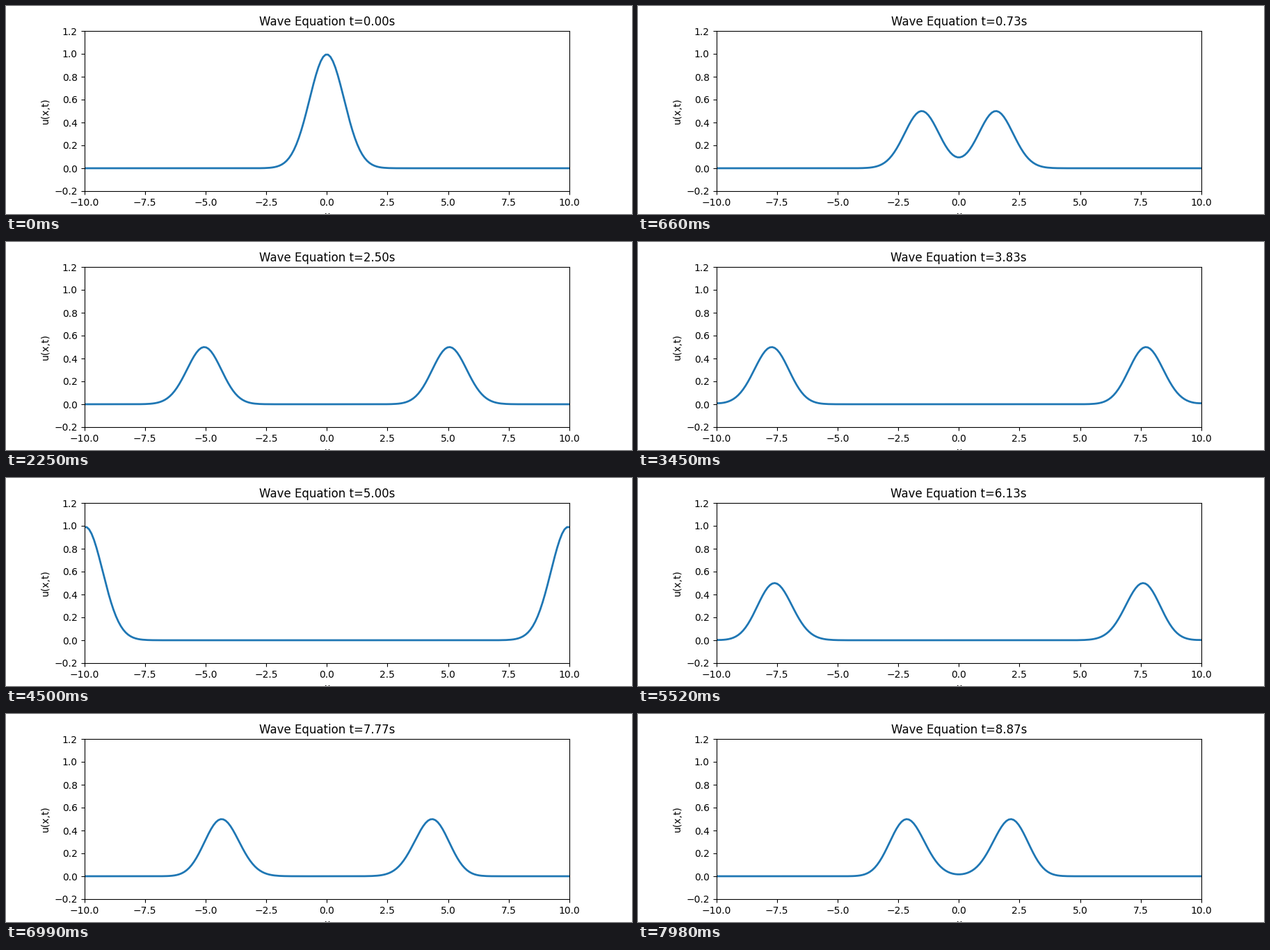
Animation of 900x300 px, one loop 8000 ms. Source, as a matplotlib script:

```python
import numpy as np
import matplotlib.pyplot as plt
from matplotlib.animation import FuncAnimation

FRAMES = 267
LOOP_MS = 8000
FPS = 30
SUBSTEPS = 10
SPEED = 2.0

x = np.linspace(-10, 10, 200)
dx = x[1] - x[0]
dt = 1 / (FPS * SUBSTEPS)
r2 = (SPEED * dt / dx) ** 2


def laplacian(u):
    return u[2:] - 2 * u[1:-1] + u[:-2]


def reflect(u):
    """Free ends: the border copies its neighbour."""
    u[0], u[-1] = u[1], u[-2]


def simulate():
    """Leapfrog solution of the wave equation, one row per frame."""
    u = np.exp(-x ** 2)
    prev = u.copy()
    prev[1:-1] += 0.5 * r2 * laplacian(u)  # starts at rest
    rows = []
    for _ in range(FRAMES):
        for _ in range(SUBSTEPS):
            new = u.copy()
            new[1:-1] = 2 * u[1:-1] - prev[1:-1] + r2 * laplacian(u)
            reflect(new)
            prev, u = u, new
        rows.append(u)
    return rows


waves = simulate()

fig, ax = plt.subplots(figsize=(9, 3), dpi=100)
line, = ax.plot(x, waves[0], lw=2)
ax.set_xlim(-10, 10)
ax.set_ylim(-0.2, 1.2)
ax.set_xlabel("x")
ax.set_ylabel("u(x,t)")
title = ax.set_title("")


def update(i):
    line.set_ydata(waves[i])
    title.set_text(f"Wave Equation t={i / FPS:.2f}s")
    return line, title


def init():
    return update(0)


anim = FuncAnimation(fig, update, frames=FRAMES, init_func=init,
                     interval=LOOP_MS / FRAMES, repeat=True, repeat_delay=0)
plt.show()
```
